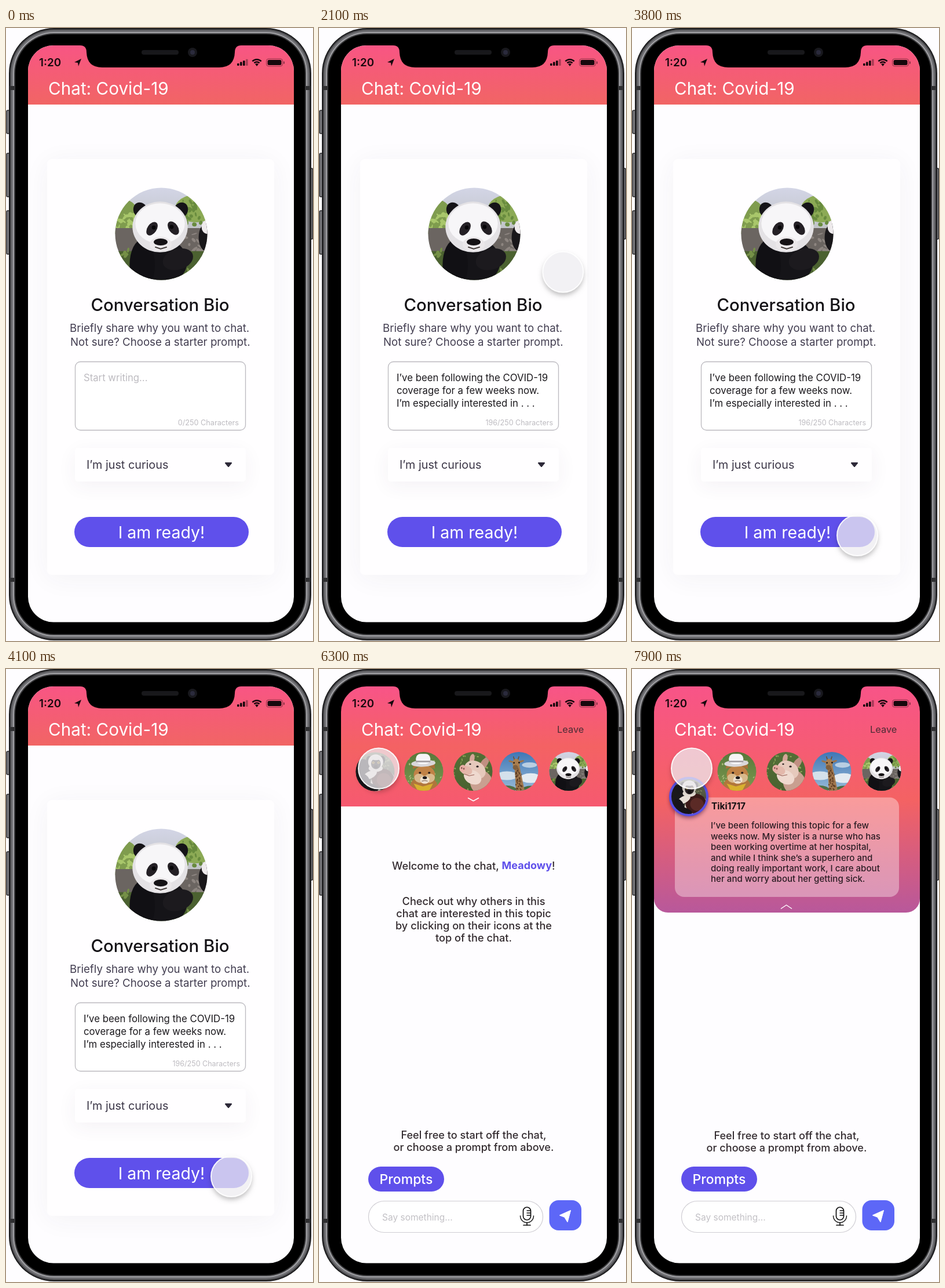
Animation, 530 px wide and 1057 px high, one loop 8 s. Source, as an HTML page with a canvas:

```html
<!DOCTYPE html>
<html lang="en">
<head>
<meta charset="utf-8">
<title>Chat prototype</title>
<style>
  html, body { margin: 0; width: 100%; height: 100%; overflow: hidden; background: #fff; }
  canvas { display: block; width: 530px; height: 1057px; }
</style>
</head>
<body>
<canvas id="stage" width="530" height="1057"></canvas>
<script>
const W = 530, H = 1057, LOOP = 8000, STEP = 100;
const INK = '#332b2f', VIOLET = '#5f50eb', GRAY = '#bdbbc0';
const stage = document.getElementById('stage').getContext('2d');
const chatLayer = Object.assign(document.createElement('canvas'), { width: W, height: H });
const chatCtx = chatLayer.getContext('2d');
let g = stage;

const lerp = (a, b, p) => a + (b - a) * p;
const span = (t, start, length) => Math.min(1, Math.max(0, (t - start) / length));
const ease = p => p < .5 ? 4 * p ** 3 : 1 - (2 - 2 * p) ** 3 / 2;
const mix = (a, b, p) => `rgb(${a.map((v, i) => Math.round(lerp(v, b[i], p)))})`;

function withAlpha(alpha, draw) {
  if (alpha <= 0) return;
  g.save();
  g.globalAlpha *= alpha;
  draw();
  g.restore();
}

function box(x, y, w, h, r, fill, stroke, line = 1) {
  g.beginPath();
  g.roundRect(x, y, w, h, r);
  if (fill) { g.fillStyle = fill; g.fill(); }
  if (stroke) { g.strokeStyle = stroke; g.lineWidth = line; g.stroke(); }
}

function shadowBox(x, y, w, h, r, fill, shadow, blur, dy) {
  g.save();
  g.shadowColor = shadow;
  g.shadowBlur = blur;
  g.shadowOffsetY = dy;
  box(x, y, w, h, r, fill);
  g.restore();
}

function oval(fill, x, y, rx, ry = rx, turn = 0) {
  g.fillStyle = fill;
  g.beginPath();
  g.ellipse(x, y, rx, ry, turn, 0, 7);
  g.fill();
}

function poly(fill, ...points) {
  g.fillStyle = fill;
  g.beginPath();
  points.forEach(([x, y]) => g.lineTo(x, y));
  g.fill();
}

function lines(color, width, ...points) {
  g.strokeStyle = color;
  g.lineWidth = width;
  g.lineCap = g.lineJoin = 'round';
  g.beginPath();
  points.forEach(([x, y], i) => i ? g.lineTo(x, y) : g.moveTo(x, y));
  g.stroke();
}

// y is the middle of the capital letters; returns the advance width
function text(str, x, y, size, color, weight = 400, align = 'left') {
  g.font = `${weight} ${size}px Inter, "Open Sans", sans-serif`;
  g.textAlign = align;
  g.fillStyle = color;
  g.fillText(str, x, y + size * .36);
  return g.measureText(str).width;
}

function paragraph(rows, x, y, pitch, ...style) {
  rows.forEach((row, i) => text(row, x, y + i * pitch, ...style));
}

function flecks(color, count, x, y, w, h, seed) {
  const rnd = () => (seed = seed * 16807 % 2147483647) / 2147483647;
  for (let i = 0; i < count; i++) {
    oval(color, x + w * rnd(), y + h * rnd(), 2 + 5 * rnd(), 1 + 3 * rnd(), 3 * rnd());
  }
}

// Portraits are painted around 0,0 in a circle of radius 80.
function avatar(x, y, r, paint) {
  g.save();
  g.beginPath();
  g.arc(x, y, r, 0, 7);
  g.clip();
  g.translate(x, y);
  g.scale(r / 80, r / 80);
  paint();
  g.restore();
}

function backdrop(top, bottom) {
  const sky = g.createLinearGradient(0, -80, 0, 80);
  sky.addColorStop(0, top);
  sky.addColorStop(1, bottom);
  g.fillStyle = sky;
  g.fillRect(-82, -82, 164, 164);
}

function panda() {
  backdrop('#d3d5e6', '#a9ae9f');
  oval('#7f9c4e', -66, -28, 28, 32);
  oval('#8caa55', 60, -44, 36, 24);
  flecks('#a9c76b', 28, -80, -58, 45, 50, 17);
  flecks('#688b3e', 24, 32, -60, 48, 46, 29);
  box(-82, -10, 164, 50, 0, '#6b6561');
  flecks('#8d8580', 14, 40, -10, 40, 40, 11);
  box(-82, 30, 164, 54, 0, '#4b6130');
  flecks('#759047', 50, -80, 26, 160, 56, 43);
  oval('#19171a', 78, 6, 13, 24);
  oval('#eeeaec', 80, -12, 10, 12);
  oval('#151418', -4, 48, 49, 42);
  oval('#111014', -33, 54, 22, 44);
  oval('#1c1a1e', 29, 44, 27, 18, -.3);
  oval('#151418', -36, -41, 12, 14, -.5);
  oval('#151418', 34, -41, 12, 14, .5);
  oval('#e4e2e5', -2, -12, 48, 44);
  oval('#f7f6f8', -2, -18, 43, 35);
  oval('#242025', -16, -9, 8, 13, .6);
  oval('#242025', 21, -10, 8, 13, -.6);
  oval('#070608', -13, -11, 3.5);
  oval('#070608', 18, -12, 3.5);
  oval('#ebe8ea', -1, 18, 19, 13);
  oval('#151215', -1, 14, 12, 6);
  lines('#39312f', 2, [-10, 23], [-1, 26], [9, 23]);
}

function lemur() {
  backdrop('#737a5c', '#2c2b22');
  flecks('#8c9167', 20, 10, -70, 70, 70, 37);
  oval('#1a191b', -50, 4, 34, 56);
  oval('#ddd4ca', 32, 42, 52, 44, -.5);
  oval('#3b1a19', 32, 32, 47, 44, .4);
  oval('#5b2a26', 36, 34, 30, 28, .3);
  oval('#e6dfd6', -22, 14, 32, 15, -.5);
  oval('#17141a', -42, 40, 20, 32, -.4);
  oval('#171418', -22, 62, 38, 15, .3);
  oval('#1b191c', -25, -49, 12, 16);
  oval('#1b191c', 29, -49, 12, 16);
  oval('#eee8df', 2, -40, 31, 31);
  oval('#e4ddd4', 2, -14, 29, 15);
  oval('#2c2628', 3, -32, 20, 22);
  oval('#e9e3da', 3, -56, 20, 9);
  oval('#d6a936', -8, -37, 5);
  oval('#d6a936', 14, -37, 5);
  oval('#111', -8, -37, 2.5);
  oval('#111', 14, -37, 2.5);
  oval('#171314', 3, -20, 8, 7);
}

function dog() {
  backdrop('#57783a', '#7c9950');
  flecks('#a6b978', 34, -80, -60, 160, 130, 61);
  oval('#b0763c', 0, 60, 56, 40);
  poly('#a9703a', [-46, -10], [-42, -34], [-14, -22]);
  poly('#a9703a', [46, -10], [44, -34], [16, -22]);
  oval('#c08246', 2, 14, 44, 38);
  oval('#d9b98c', -18, 28, 22, 18, .3);
  oval('#d9b98c', 24, 28, 22, 18, -.3);
  oval('#efe2d0', 4, 35, 19, 16);
  oval('#241b19', -16, 6, 5, 4);
  oval('#241b19', 22, 6, 5, 4);
  oval('#1d191b', 4, 26, 9, 6);
  lines('#563b30', 2, [-8, 40], [4, 38], [15, 40]);
  poly('#d8b02e', [-42, 50], [-4, 62], [38, 50], [22, 80], [-25, 80]);
  oval('#d9d7da', -2, -33, 50, 14, -.05);
  box(-33, -72, 60, 42, 20, '#f6f5f7');
  box(-33, -44, 60, 7, 2, '#a9a4a8');
}

function pig() {
  backdrop('#536f36', '#4a6230');
  flecks('#8da657', 45, -80, -80, 160, 160, 83);
  oval('#c99f90', 34, 46, 46, 52, -.4);
  oval('#c08f82', 44, -30, 14, 32, .6);
  oval('#d5a597', -4, -52, 10, 20, .2);
  oval('#e6c9bc', 8, -6, 46, 36, .5);
  oval('#efd9cf', -2, 24, 38, 28, .5);
  oval('#e3b8ab', -28, -4, 25, 18, .3);
  oval('#e9aea5', -43, -12, 13, 15, .3);
  oval('#875850', -47, -14, 3, 4);
  oval('#875850', -38, -11, 3, 4);
  oval('#2d2223', 18, -20, 5, 4);
  oval('#2d2223', -12, -30, 4, 3);
  lines('#a8756b', 3, [-36, 11], [-16, 18], [4, 14]);
}

function giraffe() {
  backdrop('#3f77b6', '#97bad8');
  oval('#d4e0eb', -49, 18, 46, 18);
  oval('#e4ebf1', 49, 28, 44, 20);
  oval('#b9cee2', 44, -26, 31, 11);
  oval('#527046', -52, 74, 40, 16);
  oval('#496a3d', 51, 75, 38, 16);
  poly('#a1784e', [-18, -26], [2, -26], [24, 80], [-12, 80]);
  flecks('#644126', 30, -12, -18, 24, 96, 97);
  lines('#6f4e32', 4, [-18, -47], [-22, -60]);
  lines('#6f4e32', 4, [-4, -47], [0, -60]);
  oval('#9d7348', -31, -40, 12, 4, .3);
  oval('#9d7348', 10, -41, 12, 4, -.3);
  oval('#a97e4f', -11, -33, 15, 19);
  oval('#80603f', -14, -16, 11, 10);
  oval('#201a18', -20, -35, 3.5);
  oval('#201a18', 1, -36, 3.5);
}

function header(h, r, ...colors) {
  const fade = g.createLinearGradient(0, 30, 0, h);
  colors.forEach((c, i) => fade.addColorStop(i / (colors.length - 1), c));
  box(38, 30, 459, h - 30, [0, 0, r, r], fade);
}

function title() {
  text('Chat: Covid-19', 73, 104, 29.7, '#fff');
}

function clearScreen() {
  g.fillStyle = '#fefdff';
  g.fillRect(36, 28, 464, 1000);
}

function bioScreen(t) {
  clearScreen();
  header(132, 0, '#f85584', '#f16564');
  title();
  shadowBox(71, 226, 392, 717, 8, '#fffeff', 'rgba(60,50,80,.055)', 46, 6);
  avatar(268, 355, 79.5, panda);
  text('Conversation Bio', 266, 477, 29.4, '#141216', 500, 'center');
  text('Briefly share why you want to chat.', 110, 517, 18.7, '#423d50');
  text('Not sure? Choose a starter prompt.', 111, 541, 18.7, '#423d50');
  box(119.5, 575.5, 294, 118, 9, '#fff', '#bab8be', 1.3);

  const filled = span(t, 900, 300);
  withAlpha(1 - filled, () => {
    text('Start writing...', 134, 603, 16.7, GRAY);
    text('0/250 Characters', 402, 680, 12.7, GRAY, 400, 'right');
  });
  withAlpha(filled, () => {
    paragraph(['I’ve been following the COVID-19', 'coverage for a few weeks now.',
      'I’m especially interested in . . .'], 134, 603, 22, 16.8, '#1b191d');
    text('196/250 Characters', 404, 680, 12.5, GRAY, 400, 'right');
  });

  shadowBox(119, 724, 295, 58, 5, '#fffeff', 'rgba(60,50,80,.06)', 34, 8);
  text('I’m just curious', 139, 753, 19.8, '#3b3647');
  poly('#2d2938', [378, 750], [390, 750], [384, 757]);
  lines('#2d2938', 2, [379, 750], [389, 750], [384, 756], [379, 750]);
  box(118, 843, 301, 52, 26, VIOLET);
  text('I am ready!', 268.5, 870, 28.5, '#fff', 400, 'center');
}

function microphone() {
  box(352.5, 928, 13, 22, 6.5, null, '#111', 1.7);
  lines('#111', 1.4, [359, 934], [365, 934]);
  lines('#111', 1.4, [359, 938], [365, 938]);
  lines('#111', 1.4, [359, 942], [365, 942]);
  g.beginPath();
  g.arc(359, 943, 11.5, 0, Math.PI);
  g.stroke();
  lines('#111', 1.7, [359, 955], [359, 959]);
  lines('#111', 1.7, [353, 959], [365, 959]);
}

function welcome() {
  let x = 126;
  x += text('Welcome to the chat, ', x, 339, 18.3, INK, 500);
  x += text('Meadowy', x, 339, 18, VIOLET, 700);
  text('!', x, 339, 18.3, INK, 500);
  paragraph(['Check out why others in this', 'chat are interested in this topic',
    'by clicking on their icons at the', 'top of the chat.'], 267, 400, 21, 18.2, INK, 500, 'center');
}

function story() {
  box(74, 221.5, 387, 171.5, 16, 'rgba(255,240,240,.4)');
  text('Tiki1717', 137, 236, 15.5, '#171114', 700);
  paragraph(['I’ve been following this topic for a few', 'weeks now. My sister is a nurse who has',
    'been working overtime at her hospital,', 'and while I think she’s a superhero and',
    'doing really important work, I care about', 'her and worry about her getting sick.'],
    136, 270, 18.4, 15.1, '#2c1d24', 500);
}

function chatScreen(t) {
  const p = ease(span(t, 6800, 800));
  clearScreen();
  header(lerp(237, 420, p), 24 * p, '#f85488', '#f46263', mix([246, 89, 112], [184, 88, 155], p));
  title();
  text('Leave', 411, 104, 16.4, '#4c2c35');
  withAlpha(p * (1 - p) * 4, () => lines('rgba(255,255,255,.8)', 1, [38, 132], [497, 132]));
  withAlpha(p, story);

  const lemurX = lerp(97, 98, p), lemurY = lerp(177, 220, p);
  withAlpha(p, () => shadowBox(lemurX - 33, lemurY - 33, 66, 66, 33, VIOLET, 'rgba(40,0,40,.5)', 7, 4));
  avatar(lemurX, lemurY, 33.5 - 2 * p, lemur);
  withAlpha(p, () => box(lemurX - 32, lemurY - 32, 64, 64, 32, null, '#5750e4', 4));
  [[181, dog], [266, pig], [345, giraffe], [431, panda]]
    .forEach(([x, paint]) => avatar(x, 176.5, 33.5, paint));

  const tipY = lerp(225, 410, p), bend = lerp(2.5, -3, p);
  lines('#fff', 1.5, [257.5, tipY - bend], [266.5, tipY + bend], [275.5, tipY - bend]);

  withAlpha(1 - p, welcome);
  paragraph(['Feel free to start off the chat,', 'or choose a prompt from above.'],
    267, 803 + p, 21, 18.1, INK, 500, 'center');
  box(85, 858, 131, 43, 21.5, VIOLET);
  text('Prompts', 150.5, 880, 23, '#fff', 500, 'center');
  box(85.5, 917.5, 301, 54, 27, '#fff', '#cfcdd3', 1.2);
  text('Say something...', 109, 945, 15.5, '#c2c0c5');
  microphone();
  box(397.5, 916, 55.5, 52, 16, '#5d67f7');
  poly('#fff', [435, 933], [415, 942], [424, 945], [429, 954]);
  lines('#fff', 1.5, [434, 934], [416, 942], [424, 945], [429, 953], [434, 934]);
}

// The shadow is kept outside the disc so that it does not darken the glass.
function cursor(t) {
  const down = ease(span(t, 1830, 1000)), up = ease(span(t, 4730, 1000));
  const x = lerp(lerp(424, 389, down), 103, up);
  const y = lerp(lerp(382, 875, down), 171.5, up);
  withAlpha(span(t, 1800, 200), () => {
    g.save();
    g.beginPath();
    g.rect(0, 0, W, H);
    g.arc(x, y, 35, 0, 7);
    g.clip('evenodd');
    shadowBox(x - 35, y - 35, 70, 70, 35, '#f4f2f5', 'rgba(0,0,0,.26)', 8, 5);
    g.restore();
    box(x - 35, y - 35, 70, 70, 35, 'rgba(238,237,240,.75)', 'rgba(255,255,255,.9)', 2);
  });
}

function phoneBody() {
  g.fillStyle = '#fefdff';
  g.fillRect(0, 0, W, H);
  [[142, 40], [216, 75], [315, 75]].forEach(([y, h]) => box(1, y, 8, h, 2, '#7c7c80', '#29292b', 1.5));
  box(522, 242, 7.5, 122, 2, '#7c7c80', '#29292b', 1.5);
  [[0, '#19191b'], [2, '#49494c'], [4, '#6f6f73'], [7, '#a2a2a6'], [9, '#3a3a3c'], [11, '#000']]
    .forEach(([inset, color]) =>
      box(5 + inset, inset, 522 - 2 * inset, 1056 - 2 * inset, 78 - inset, color));
  g.fillStyle = '#2f2f31';
  for (const y of [100, 948]) {
    g.fillRect(6, y, 9, 7);
    g.fillRect(517, y, 9, 7);
  }
}

function notch() {
  g.fillStyle = '#000';
  g.beginPath();
  g.moveTo(128, 28);
  g.lineTo(128, 30);
  g.quadraticCurveTo(139, 30, 139, 42);
  g.quadraticCurveTo(140, 68, 166, 68);
  g.lineTo(368, 68);
  g.quadraticCurveTo(394, 68, 395, 42);
  g.quadraticCurveTo(395, 30, 406, 30);
  g.lineTo(406, 28);
  g.fill();
  box(234, 38, 64, 8, 4, '#18181b');
  oval('#18181d', 322, 42, 8);
  oval('#2a2a3c', 322, 42, 4);
}

function statusBar() {
  text('1:20', 57, 59, 18.8, '#17080d', 600);
  poly('#17080d', [130, 53], [118, 59], [124, 60], [125, 66]);
  for (let i = 0; i < 4; i++) {
    const h = 4 + 2.4 * i;
    box(399 + 5 * i, 65 - h, 3.6, h, 1, i < 3 ? '#17080d' : 'rgba(23,8,13,.35)');
  }
  g.strokeStyle = '#17080d';
  g.lineCap = 'butt';
  g.lineWidth = 2.5;
  for (const r of [6.5, 10.8]) {
    g.beginPath();
    g.arc(433, 65, r, -Math.PI * .75, -Math.PI * .25);
    g.stroke();
  }
  poly('#17080d', [433, 66], [430, 62], [433, 61], [436, 62]);
  box(449.5, 53, 28, 13, 4, null, 'rgba(23,8,13,.45)', 1);
  box(451.5, 55, 24, 9, 2.5, '#17080d');
  box(479, 57.5, 1.8, 4.5, 1, 'rgba(23,8,13,.5)');
}

function render(t) {
  g = stage;
  phoneBody();
  g.save();
  g.beginPath();
  g.roundRect(38, 30, 459, 994.5, 44);
  g.clip();
  const dissolve = span(t, 4100, 300);
  if (dissolve < 1) bioScreen(t);
  if (dissolve > 0) {
    g = chatCtx;
    chatScreen(t);
    g = stage;
    withAlpha(dissolve, () => g.drawImage(chatLayer, 0, 0));
  }
  statusBar();
  cursor(t);
  g.restore();
  notch();
}

function tick() {
  const t = performance.now() % LOOP;
  render(Math.floor(t / STEP) * STEP);
  requestAnimationFrame(tick);
}
tick();
</script>
</body>
</html>
```
